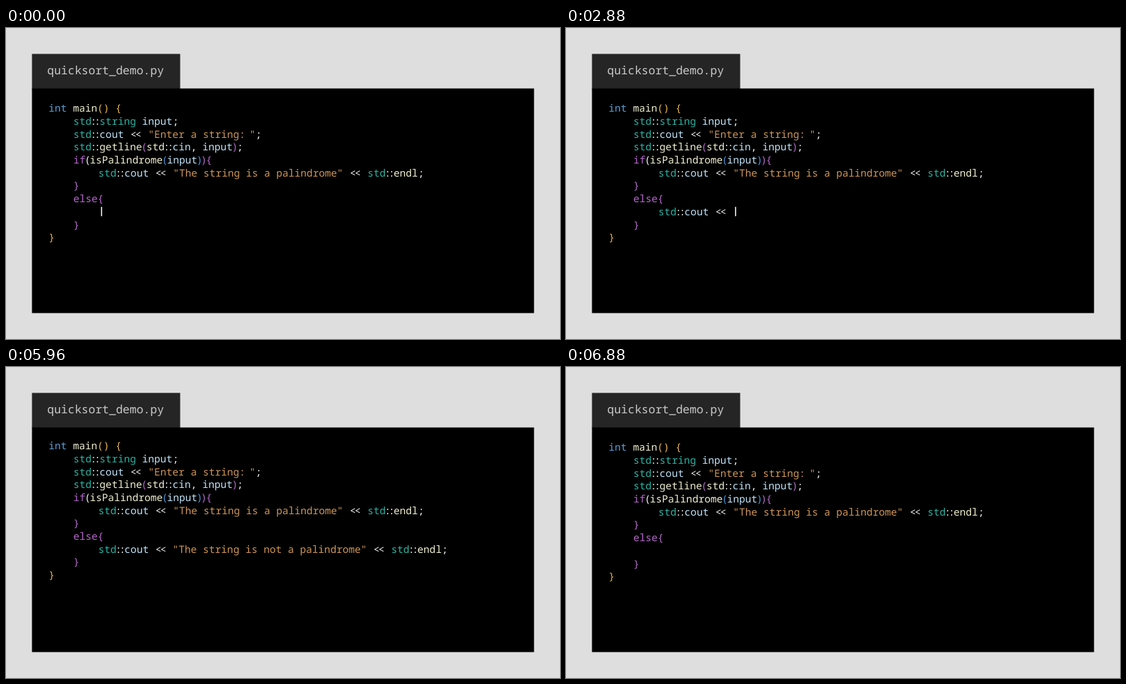
These frames come from a looping animation (800x450 px, 6920 ms). An HTML page:

```html
<!DOCTYPE html>
<html lang="en">
<head>
<meta charset="utf-8">
<title>Code completion</title>
<style>
  html, body { margin: 0; width: 100%; height: 100%; overflow: hidden; background: #dedede; }
  svg { display: block; width: 800px; height: 450px; }
  text {
    font-family: "Noto Sans Mono", "DejaVu Sans Mono", monospace;
    font-size: 14.62px;
    white-space: pre;
    text-rendering: geometricPrecision;
    font-variant-ligatures: none;
  }
  .title { font-size: 16.55px; fill: #c9c9c9; }
</style>
</head>
<body>
<svg viewBox="0 0 800 450">
  <defs><clipPath id="panel"><rect x="38" y="88" width="724" height="324"/></clipPath></defs>
  <rect width="800" height="450" fill="#dedede"/>
  <rect x="37.5" y="37.5" width="214" height="51" fill="#252525"/>
  <rect x="37.5" y="87.5" width="725" height="325" fill="#000"/>
  <text class="title" x="59.5" y="67.3">quicksort_demo.py</text>
  <g clip-path="url(#panel)"><g id="page"></g></g>
</svg>
<script>
const LOOP = 6920;
const CELL = 8.772, PITCH = 18.7, BASE = 121.2;
const LEFT = [61.6, 97.3, 133.3];
const COPY_GAP = 308.5;
const TYPED_ROW = 8, TYPED_CHARS = 13;
const TYPE_START = 1000, TYPE_STEP = 110;
const GHOST_AT = 3000, ACCEPT_AT = 4400;
const SCROLL_AT = 5848, SCROLL_MS = 1038;

const COLOR = {
  blue: '#5b9ed6', cream: '#f1f0d2', gold: '#e9b64c', teal: '#2bb3a3',
  sky: '#bfe4fa', white: '#f4f4f4', orange: '#cf9656', purple: '#b768cc',
  azure: '#4596dc', ghost: '#4b4b4b'
};

// Token: [color, text, shift before it]
const STD = [['teal', 'std'], ['white', '::']];
const COUT = [...STD, ['sky', 'cout'], ['white', ' '], ['white', '<<'], ['white', ' ']];
const ENDL = [['white', ' '], ['white', '<<'], ['white', ' '], ...STD, ['cream', 'endl'], ['white', ';']];
const ROWS = [
  [0, 0, [['blue', 'int '], ['cream', 'main'], ['gold', '() {']]],
  [1, 1, [...STD, ['teal', 'string '], ['sky', 'input'], ['white', ';']]],
  [2, 1, [...COUT, ['orange', '"Enter a string: '], ['orange', '"', -3], ['white', ';']]],
  [3, 1, [...STD, ['cream', 'getline'], ['purple', '('], ['cream', 'std'], ['white', '::'],
    ['sky', 'cin'], ['white', ', '], ['sky', 'input', -1], ['purple', ')'], ['white', ';']]],
  [4, 1, [['purple', 'if'], ['white', '('], ['cream', 'isPalindrome'], ['azure', '('],
    ['sky', 'input'], ['azure', ')'], ['purple', ')'], ['purple', '{']]],
  [5, 2, [...COUT, ['orange', '"The string is a palindrome"'], ...ENDL]],
  [6, 1, [['purple', '}']]],
  [7, 1, [['purple', 'else{']]],
  [9, 1, [['purple', '}']]],
  [10, 0, [['gold', '}']]]
];
const COMPLETION = [['orange', '"The string is not a palindrome"', -0.8], ...ENDL];

// Width used per character and spacing it is drawn with
const TIGHT = { '::': [5.75, 5.75], '(': [6.2, 6.2], ')': [6.2, 6.2], '<<': [CELL, 7] };
const metrics = text => TIGHT[text] || [CELL, CELL];

function add(parent, tag, attrs) {
  const node = document.createElementNS('http://www.w3.org/2000/svg', tag);
  for (const key in attrs) node.setAttribute(key, attrs[key]);
  return parent.appendChild(node);
}

// Draws tokens from x and returns the parts and the end of the line
function drawTokens(parent, row, x, tokens, color) {
  const parts = [];
  for (const [name, text, shift = 0] of tokens) {
    const [used, drawn] = metrics(text);
    x += shift;
    const inset = used === drawn ? (drawn - CELL) / 2 : (used - drawn) / 2;
    const node = add(parent, 'text', {
      x: x + inset, y: BASE + row * PITCH,
      fill: color || COLOR[name], 'letter-spacing': drawn - CELL
    });
    node.textContent = text;
    parts.push({ node, text, x, used });
    x += used * text.length;
  }
  return { parts, end: x };
}

function drawCode(y) {
  const block = add(page, 'g', { transform: `translate(0 ${y})` });
  for (const [row, indent, tokens] of ROWS) drawTokens(block, row, LEFT[indent], tokens);
  return block;
}

const page = document.getElementById('page');
const first = drawCode(0);
drawCode(COPY_GAP);

const typed = drawTokens(first, TYPED_ROW, LEFT[2], COUT);
const ghostGroup = add(first, 'g', {});
const finalGroup = add(first, 'g', {});
drawTokens(ghostGroup, TYPED_ROW, typed.end, COMPLETION, COLOR.ghost);
const lineEnd = drawTokens(finalGroup, TYPED_ROW, typed.end, COMPLETION).end;
const cursor = add(first, 'rect', {
  y: BASE + TYPED_ROW * PITCH - 12, width: 1.5, height: 13.5, fill: '#fff'
});

const show = (node, on) => node.setAttribute('visibility', on ? 'visible' : 'hidden');
const clamp = (v, lo, hi) => Math.min(hi, Math.max(lo, v));

// Symmetric cubic-bezier(a, 0, 1 - a, 1)
function ease(p, a = 0.83) {
  if (p <= 0 || p >= 1) return clamp(p, 0, 1);
  const rise = s => s * s * (3 - 2 * s);
  let lo = 0, hi = 1;
  for (let i = 0; i < 30; i++) {
    const s = (lo + hi) / 2;
    if (rise(s) + 3 * a * s * (1 - s) * (1 - 2 * s) < p) lo = s; else hi = s;
  }
  return rise(lo);
}

function cursorOn(t) {
  if (t < TYPE_START) return t < 500;
  if (t < GHOST_AT) return t < 2920;
  if (t < ACCEPT_AT || t >= 5800) return false;
  return (t - ACCEPT_AT) % 1000 < 500;
}

function typeLine(count) {
  let x = LEFT[2];
  for (const part of typed.parts) {
    const n = clamp(count, 0, part.text.length);
    part.node.textContent = part.text.slice(0, n);
    if (n) x = part.x + n * part.used;
    count -= n;
  }
  return x;
}

function render(t) {
  const count = clamp(Math.floor((t - TYPE_START) / TYPE_STEP), 0, TYPED_CHARS);
  const typedEnd = typeLine(count);
  const accepted = t >= ACCEPT_AT;
  show(ghostGroup, t >= GHOST_AT && !accepted);
  show(finalGroup, accepted);
  show(cursor, cursorOn(t));
  cursor.setAttribute('x', (accepted ? lineEnd : typedEnd) + (count ? 2.8 : 3.9));
  const scroll = COPY_GAP * ease((t - SCROLL_AT) / SCROLL_MS);
  page.setAttribute('transform', `translate(0 ${-scroll})`);
}

const start = performance.now();
function tick() {
  render((performance.now() - start) % LOOP);
  requestAnimationFrame(tick);
}
render(0);
requestAnimationFrame(tick);
</script>
</body>
</html>
```
